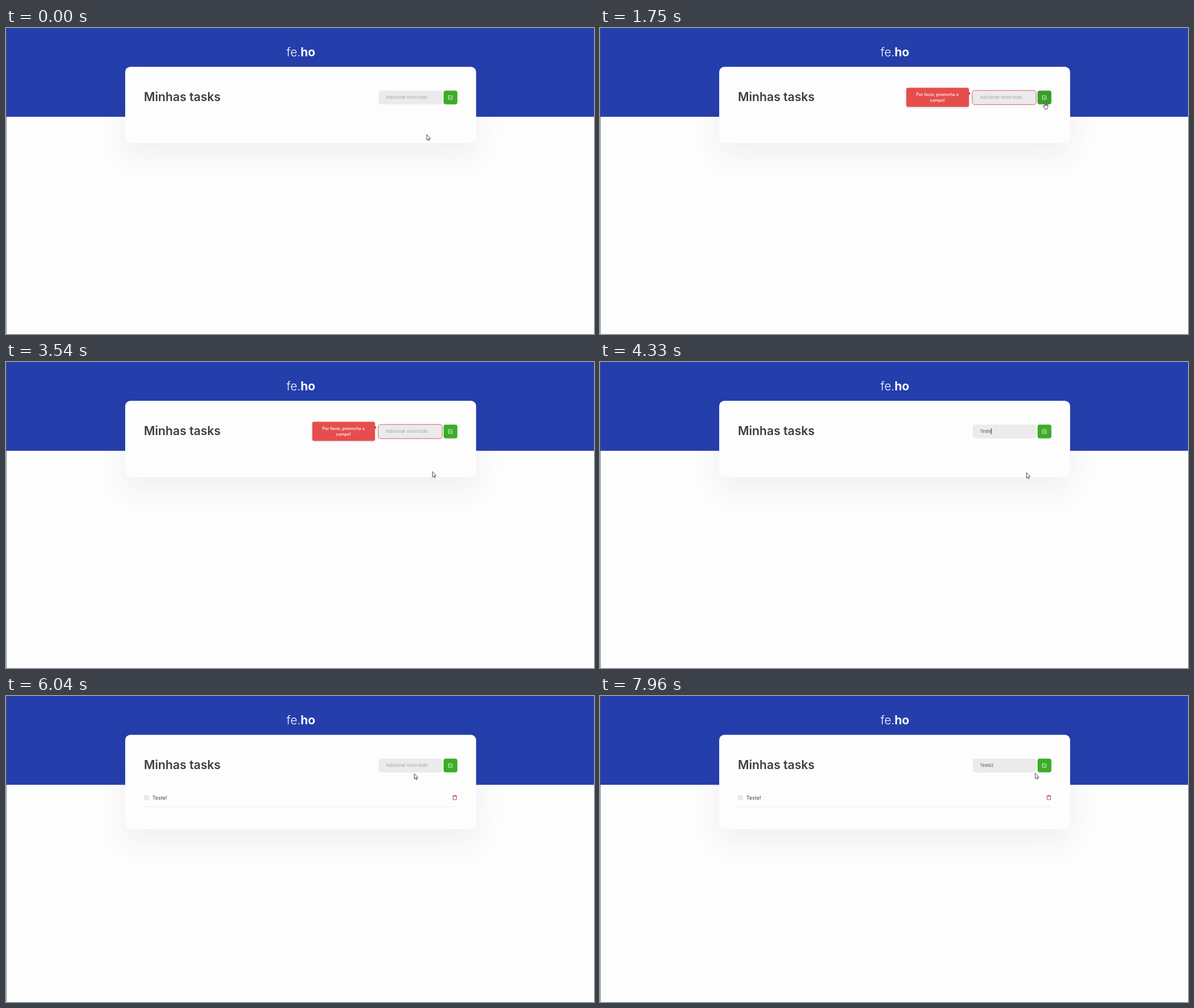
An HTML page with a canvas for the animation above (8 s loop, 1036x540 px).

```html
<!DOCTYPE html>
<html lang="pt">
<head>
<meta charset="utf-8">
<title>Minhas tasks</title>
<style>
html, body { margin: 0; width: 100%; height: 100%; overflow: hidden; background: #fdfdfe; }
canvas { display: block; width: 1036px; height: 540px; }
</style>
</head>
<body>
<canvas id="stage"></canvas>
<script>
const W = 1036, H = 540, LOOP = 8000;
const canvas = document.getElementById('stage');
const ctx = canvas.getContext('2d');
const dpr = window.devicePixelRatio || 1;
canvas.width = W * dpr;
canvas.height = H * dpr;

const ERROR_ON = 1180, ADD_AT = 5560;
const FIRST = { text: 'Teste!', keys: [3550, 3720, 3880, 4040, 4200, 4480] };
const SECOND = { text: 'Teste2', keys: [6800, 6900, 7010, 7120, 7230, 7380] };

// Pointer stops: time, x, y
const STOPS = [
  [0, 741, 188], [250, 741, 188], [850, 784, 130], [2150, 784, 130],
  [2650, 720, 125], [3080, 720, 125], [3320, 751, 193], [4330, 751, 195],
  [4600, 753, 201], [4800, 753, 201], [5250, 786.5, 126.5], [5650, 786.5, 126.5],
  [6040, 719, 137], [6200, 714, 125], [6480, 714, 125], [6700, 742, 171],
  [7380, 742, 171], [7640, 750, 150], [7960, 766.5, 136], [8000, 768, 135.5]
];

const clamp = v => Math.max(0, Math.min(1, v));
const ease = v => v * v * (3 - 2 * v);

function pointerAt(t) {
  let i = 0;
  while (i < STOPS.length - 2 && t >= STOPS[i + 1][0]) i++;
  const [t0, x0, y0] = STOPS[i], [t1, x1, y1] = STOPS[i + 1];
  const k = ease(clamp((t - t0) / (t1 - t0)));
  return [x0 + (x1 - x0) * k, y0 + (y1 - y0) * k];
}

function box(x, y, w, h, r, fill, line) {
  ctx.beginPath();
  ctx.roundRect(x, y, w, h, r);
  if (fill) { ctx.fillStyle = fill; ctx.fill(); }
  if (line) { ctx.strokeStyle = line; ctx.lineWidth = 1; ctx.stroke(); }
}

function text(str, x, y, size, weight, color, align = 'left') {
  ctx.font = `${weight} ${size}px Inter, sans-serif`;
  ctx.textAlign = align;
  ctx.fillStyle = color;
  ctx.fillText(str, x, y);
  return ctx.measureText(str).width;
}

// Shape from an SVG path, placed at x, y
function icon(d, x, y, { fill, line, width = 1 }) {
  const path = new Path2D(d);
  ctx.save();
  ctx.translate(x, y);
  ctx.lineWidth = width;
  ctx.lineCap = ctx.lineJoin = 'round';
  if (fill) { ctx.fillStyle = fill; ctx.fill(path); }
  if (line) { ctx.strokeStyle = line; ctx.stroke(path); }
  ctx.restore();
}

function shadow(color, blur, dy) {
  ctx.shadowColor = color;
  ctx.shadowBlur = blur * dpr;
  ctx.shadowOffsetY = dy * dpr;
}

function drawPage(cardHeight) {
  ctx.fillStyle = '#fdfdfe';
  ctx.fillRect(0, 0, W, H);
  ctx.fillStyle = '#243eac';
  ctx.fillRect(0, 0, W, 156.7);
  ctx.fillStyle = '#57585f';
  ctx.fillRect(0, 0, 0.8, H);

  text('fe.', 519, 50, 21, 300, '#fff', 'right');
  text('ho', 519, 50, 21, 700, '#fff');

  ctx.save();
  shadow('rgba(61, 61, 77, 0.07)', 52, 21);
  box(210, 68.5, 618.3, cardHeight, 9, '#fdfdfe');
  ctx.restore();
  text('Minhas tasks', 243, 129.3, 21.2, 600, '#3d3d45');
}

function drawItem() {
  box(243, 175, 9, 9, 1, '#e9e9ea');
  text('Teste!', 258, 183, 9, 400, '#3d3d45');
  ctx.fillStyle = '#ededee';
  ctx.fillRect(243, 195, 552.5, 1);
  icon('M0 1.8H7.6 M2.3 1.6V.4H5.3V1.6 M.9 2V8H6.7V2', 786.9, 175, { line: '#b0325c', width: 0.95 });
}

function drawField(t, typed, lastKey, error) {
  if (error) box(655.8, 110.2, 112.7, 25, 4.5, '#ebebeb', `rgba(214, 92, 92, ${error})`);
  else box(656.7, 110.5, 111.8, 24.2, 4, '#ebebeb');
  let width = 0;
  if (typed) width = text(typed, 669.5, 125, 7.5, 400, '#4d4d55');
  else text('Adicionar novo todo', 669.5, 125, 7.75, 400, '#a3a3a8');

  const focused = (t > 2950 && t < ADD_AT) || t > 6420;
  if (focused && (t - lastKey) % 1000 < 500) {
    ctx.fillStyle = '#3d3d45';
    ctx.fillRect(Math.round(669.5 + width), 117, 1, 10.5);
  }
}

function drawButton(hover) {
  box(770.9, 110.4, 24.4, 24.4, 4, hover ? '#389f25' : '#3dad27');
  icon('M7 3.6V6.6Q7 7.2 6.4 7.2H.9Q.3 7.2 .3 6.6V1.1Q.3 .5 .9 .5H5 M2.4 3.4L3.8 4.8L7.6 .9',
    779.2, 118.8, { line: '#fff', width: 0.9 });
}

function drawError(alpha) {
  ctx.save();
  ctx.globalAlpha = alpha;
  icon('M0 -3L2.8 0L0 3Z', 650, 115.5, { fill: '#b5494f' });
  shadow('rgba(0, 0, 0, 0.25)', 3, 1);
  box(539.7, 105.5, 110.3, 33.4, 3, '#e54e4d');
  ctx.restore();
  ctx.save();
  ctx.globalAlpha = alpha;
  text('Por favor, preencha o', 594.5, 120.2, 7.3, 500, '#fff', 'center');
  text('campo!', 594.5, 129.8, 7.3, 500, '#fff', 'center');
  ctx.restore();
}

function drawPointer(x, y, overButton, overField) {
  if (overButton) {
    icon('M-.9 .8Q-.9 0 0 0Q.9 0 .9 .8V4.3Q1.9 3.8 2.4 4.7Q3.4 4.3 3.8 5.2Q5.1 4.8 5.1 6.2V8.6Q5 10.2 4.2 11V12.5H-.7V11.2L-3.1 7.9Q-3.8 6.8 -2.8 6.5Q-2 6.4 -.9 7.9Z M.9 4.3V6.4 M2.4 4.8V6.6 M3.8 5.3V6.8',
      x, y + 0.5, { fill: '#fff', line: '#222', width: 0.8 });
  } else if (overField) {
    icon('M-2 -4Q-.4 -4 0 -3.4Q.4 -4 2 -4 M0 -3.4V3.7 M-2 4.3Q-.4 4.3 0 3.7Q.4 4.3 2 4.3',
      x, y + 0.5, { line: '#222', width: 0.9 });
  } else {
    icon('M0 0V9.2L2.1 7.3L3.5 10.4L5 9.7L3.6 6.7H6.2Z',
      x + 0.3, y + 0.5, { fill: '#fff', line: '#222', width: 0.8 });
  }
}

function draw(t) {
  const entry = t < ADD_AT ? FIRST : SECOND;
  const count = entry.keys.filter(k => t >= k).length;
  const lastKey = count ? entry.keys[count - 1] : t < ADD_AT ? 2950 : 6420;
  const error = t < FIRST.keys[0] ? clamp((t - ERROR_ON) / 200) : 0;
  const [x, y] = pointerAt(t);
  const inRow = y > 110.5 && y < 135;
  const overButton = inRow && x > 771 && x < 795;
  const overField = inRow && x > 657 && x < 768;
  const added = t >= ADD_AT;

  ctx.setTransform(dpr, 0, 0, dpr, 0, 0);
  drawPage(added ? 166.5 : 134.5);
  if (added) drawItem();
  drawField(t, entry.text.slice(0, count), lastKey, error);
  drawButton(overButton);
  if (error) drawError(error);
  drawPointer(x, y, overButton, overField);
}

function tick() {
  draw(performance.now() % LOOP);
  requestAnimationFrame(tick);
}
tick();
</script>
</body>
</html>
```
